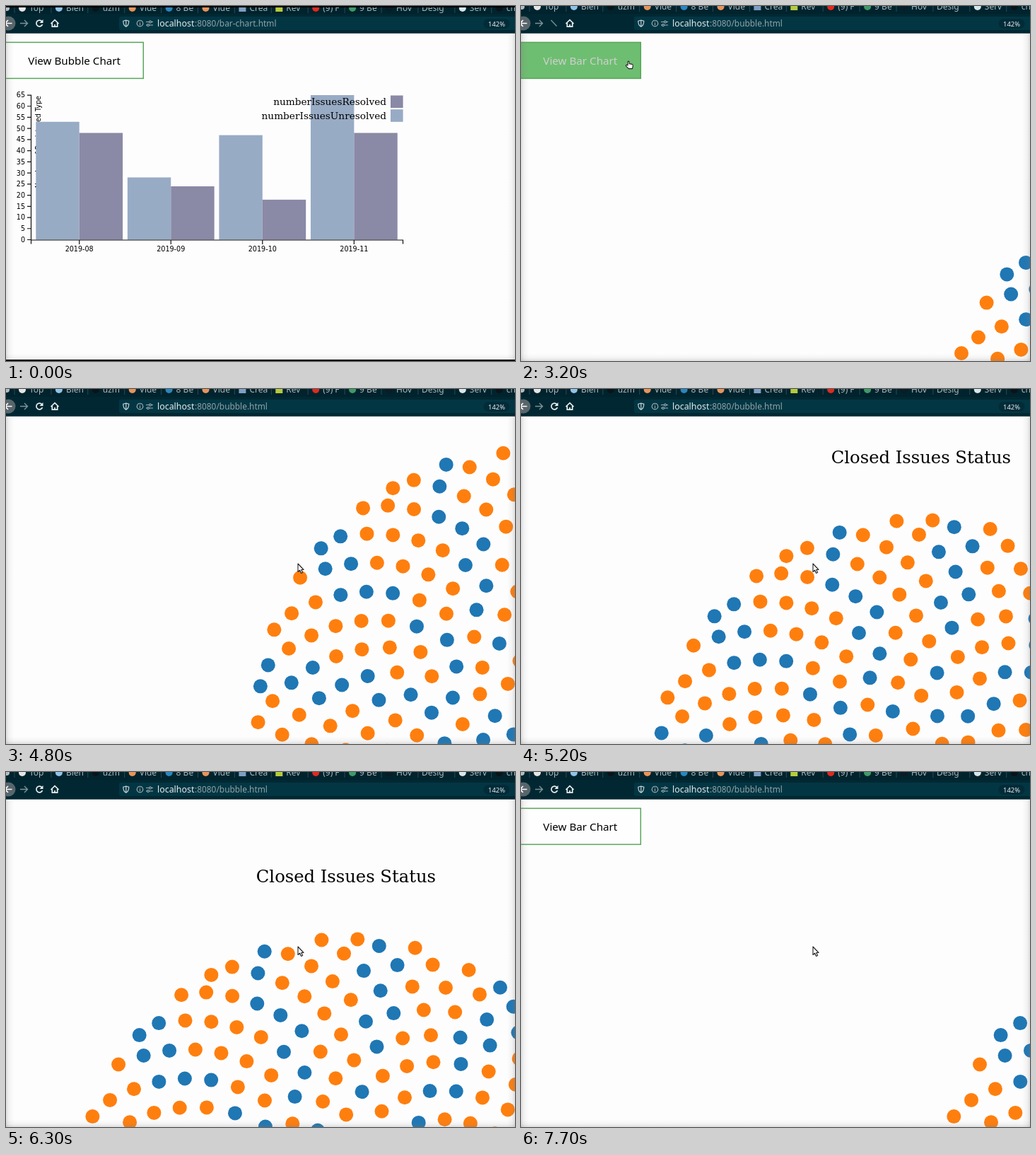
Recreate the animation shown at these times as an HTML page. Size 720 by 502 pixels, loop 8 s.

```html
<!DOCTYPE html>
<html lang="en">
<head>
<meta charset="utf-8">
<title>Issue charts</title>
<style>
html, body { margin: 0; width: 100%; height: 100%; overflow: hidden; background: #fefdfe; }
svg { display: block; width: 720px; height: 502px; }
.ui { font-family: "Noto Sans", "Open Sans", sans-serif; }
.axis { font: 9.6px "DejaVu Sans", sans-serif; }
.serif { font-family: "DejaVu Serif", serif; }
</style>
</head>
<body>
<svg id="stage" viewBox="0 0 720 502" xmlns="http://www.w3.org/2000/svg"></svg>
<script>
const LOOP = 8000, NAV = 2800;
const BLUE = '#1f77b4', ORANGE = '#ff7f0e', STEEL = '#98abc5', PLUM = '#8a89a6';
const GOLDEN = Math.PI * (3 - Math.sqrt(5));

const rect = (x, y, w, h, fill, extra = '') =>
  `<rect x="${x}" y="${y}" width="${w}" height="${h}" fill="${fill}" ${extra}/>`;
const dot = (x, y, r, fill) => `<circle cx="${x}" cy="${y}" r="${r}" fill="${fill}"/>`;
const text = (x, y, str, extra = '') => `<text x="${x}" y="${y}" ${extra}>${str}</text>`;
const line = (d, stroke, width = 1, extra = '') =>
  `<path d="${d}" fill="none" stroke="${stroke}" stroke-width="${width}" ${extra}/>`;

function barChart() {
  const base = 330.5, unit = 204.5 / 65;
  const months = [['2019-08', 53, 48], ['2019-09', 28, 24], ['2019-10', 47, 18], ['2019-11', 65, 48]];
  let out = text(-127, 49, 'Number of Registered Type',
    'class="axis" text-anchor="end" transform="rotate(-90)"');
  let ticks = '', labels = '';
  months.forEach(([name, open, done], i) => {
    const x = 42.3 + i * 129.55, mid = x + 61.4;
    out += rect(x, base - open * unit, 61.4, open * unit, STEEL);
    out += rect(mid, base - done * unit, 61.4, done * unit, PLUM);
    ticks += `M${mid} 331v6`;
    labels += text(mid, 347, name, 'text-anchor="middle"');
  });
  for (let v = 0; v <= 65; v += 5) {
    const y = base - v * unit;
    ticks += `M30 ${y}h5.5`;
    labels += text(27, y + 3.4, v, 'text-anchor="end"');
  }
  out += line('M30 126.2h5.5V336.5M35.5 331H561.5v5.5' + ticks, '#111', 1.2);
  out += `<g class="axis">${labels}</g>`;
  ['numberIssuesResolved', 'numberIssuesUnresolved'].forEach((name, i) => {
    const y = 126.5 + i * 19.7;
    out += rect(544, y, 17.6, 17.6, i ? STEEL : PLUM);
    out += text(538, y + 13.3, name, 'class="serif" font-size="13.68" text-anchor="end"');
  });
  return out;
}

function random(seed) {
  return () => (seed = seed * 16807 % 2147483647) / 2147483647;
}

// Sunflower layout with a flattened rim; blue gathers loosely in angular bands
function bubbles() {
  const rnd = random(2019);
  let out = '';
  for (let i = 0; i < 330; i++) {
    const a = i * GOLDEN, r = Math.min(381, 21.95 * Math.sqrt(i + 0.5));
    const band = Math.cos(12.2 * (a % (2 * Math.PI) - 3.334));
    const fill = band + 0.8 * (rnd() - 0.5) > 0.3 ? BLUE : ORANGE;
    out += dot((r * Math.cos(a)).toFixed(1), (r * Math.sin(a)).toFixed(1), 10, fill);
  }
  return out;
}

function tabs() {
  const list = [
    ['Top', '#e4e6e6'], ['Blen', '#8fc4e8'], ['uzm', '#0a1418'], ['Vide', '#e8945a'],
    ['8 Be', '#2a86c0'], ['Vide', '#e8945a'], ['Crea', '#7f9fc4', 1], ['Rev', '#b5cc3c', 1],
    ['(9) F', '#e02a20'], ['9 Be', '#3f9a68'], ['Hov', '#0a1c26'], ['Desig', ''],
    ['Serv', '#d8e6ea'], ['ch', '#0a1418']
  ];
  let out = dot(1, 1, 4, '#b0bec2');
  list.forEach(([name, fill, square], i) => {
    const x = 12 + i * 51.9;
    out += line(`M${x} -6V8`, '#2b4a54');
    if (fill) out += square ? rect(x + 6, -4, 10, 10, fill) : dot(x + 11, 1, 5, fill);
    out += text(fill ? x + 21 : x + 5, 4.6, name);
  });
  return `<g id="tabs" class="ui" font-size="12" fill="#a9b9be">${out}</g>`;
}

function toolbar() {
  const light = '#e6eef0', grey = '#7d9299', dim = '#9fb0b5';
  return rect(0, 0, 720, 38.5, '#00232d') + tabs() +
    rect(0, 11, 720, 27.5, '#012832') +
    rect(160, 15, 570, 19, '#033643', 'rx="3"') +
    dot(3.5, 24.5, 10, '#58666c') +
    line('M8.5 24.5H-1M3 20l-4.5 4.5L3 29', '#fff', 1.6) +
    line('M20 24.5h10M26 20l4.5 4.5L26 29', grey, 1.4) +
    `<g id="reload">${line('M51 22a4.4 4.4 0 1 0 .5 4', light, 1.7)}<path d="M52.5 19v5h-5z" fill="${light}"/></g>` +
    line('M42.5 20l8 8.5', grey, 1.3, 'id="stop"') +
    line('M63.5 25l5.5-5.3 5.5 5.3M65.3 24v5.2h7.4V24M69 29v-3', light, 1.7) +
    line('M165.8 21.3l4-1.2 4 1.2c0 4-1 6.5-4 8-3-1.5-4-4-4-8zM169.8 20v9', '#c5d2d6', 1.2) +
    line('M189.5 20.3a4.3 4.3 0 1 0 .01 0M189.5 24v3.2M189.5 22v1', dim, 1.1) +
    line('M198 22.5h4.5M205.5 22.5h2.5M198 27h1M202.5 27h5.5', dim, 1.2) +
    line('M204 21a1.5 1.5 0 1 0 .01 0M201 25.5a1.5 1.5 0 1 0 .01 0', dim, 1.1) +
    `<g class="ui">` +
    text(214, 29, 'localhost', `font-size="12.4" fill="${light}"`) +
    text(267, 29, '', 'id="path" font-size="11.9" fill="#91a3a8"') +
    rect(675.5, 18, 37, 14, '#022b38', 'rx="7"') +
    text(694, 28.5, '142%', `font-size="9.4" fill="${light}" text-anchor="middle"`) + '</g>';
}

const shade = (id, dir) =>
  `<linearGradient id="${id}" ${dir}><stop offset="0" stop-color="#777" stop-opacity=".24"/>` +
  `<stop offset=".4" stop-color="#777" stop-opacity=".08"/><stop offset="1" stop-color="#777" stop-opacity="0"/></linearGradient>`;

document.getElementById('stage').innerHTML =
  '<defs>' + shade('left', 'x2="1"') + shade('right', 'x1="1" x2="0"') +
  shade('bottom', 'x2="0" y1="1" y2="0"') + '</defs>' +
  rect(0, 0, 720, 502, '#fefdfe') +
  '<g id="page">' +
  rect(-4, 51.4, 198, 51, '#fff', 'id="button" stroke="#55a658" stroke-width="1.5"') +
  text(31.3, 82.5, '', 'id="label" class="ui" font-size="15.2"') +
  `<g id="bars">${barChart()}</g>` +
  `<g id="bubblePage">${text(970.8, 155.8, 'Closed Issues Status',
    'class="serif" font-size="24.25" text-anchor="middle"')}<g id="cluster">${bubbles()}</g></g>` +
  '</g>' +
  rect(0, 38.5, 11, 464, 'url(#left)') + rect(709, 38.5, 11, 464, 'url(#right)') +
  rect(0, 492, 720, 10, 'url(#bottom)') +
  toolbar() +
  rect(0, 0, 720, 2, '#000', 'id="edgeTop"') + rect(0, 500, 720, 2, '#000', 'id="edgeBottom"') +
  '<g id="cursor" stroke-linejoin="round" fill="#fff" stroke="#222" stroke-width="1.1">' +
  '<path id="arrow" d="M0 0V11.5L2.6 9.2L4.6 13.5L6.6 12.6L4.7 8.5H8z"/>' +
  '<path id="hand" d="M3.6 7V1.8Q4.6 .4 5.6 1.8V4.6L9.8 5.4Q11 5.9 10.8 7.5L10 11.6H4.8L1 7.8Q.6 6.3 2.2 6.3z"/>' +
  '</g>';

const el = {};
document.querySelectorAll('[id]').forEach(node => { el[node.id] = node; });
const show = (node, on) => node.setAttribute('display', on ? 'inline' : 'none');
const place = (node, x, y) => node.setAttribute('transform', `translate(${x} ${y})`);
const clamp = v => Math.min(1, Math.max(0, v));
const ease = u => 1 - (1 - clamp(u)) ** 2.4;

// keys: [time, x, y], linear between neighbours
function track(keys, t) {
  let i = 1;
  while (i < keys.length - 1 && t > keys[i][0]) i++;
  const a = keys[i - 1], b = keys[i], u = clamp((t - a[0]) / (b[0] - a[0]));
  return [a[1] + (b[1] - a[1]) * u, a[2] + (b[2] - a[2]) * u];
}

const pointer = [
  [700, 569, 186], [850, 435, 152], [1000, 470, 147], [1200, 470, 147],
  [1700, 447, 146], [1800, 447, 146], [1900, 172, 82], [2300, 172, 82],
  [2700, 147.5, 77], [3600, 147.5, 77], [4000, 413, 247]
];
const scroll = [
  [3900, 0, 0], [4500, 150, 147], [4800, 232.5, 147], [5400, 490.5, 3],
  [5500, 490.5, 0], [6300, 490.5, 0], [6900, 131.5, 0], [7400, 0, 0]
];

function hover(t) {
  if (t < NAV) return ease((t - 1900) / 400);
  return ease((t - 3000) / 400) - ease((t - 3750) / 400);
}

function render(t) {
  const bar = t < NAV;
  const [sx, sy] = track(scroll, t);
  place(el.page, -sx, -sy);
  show(el.bars, bar);
  show(el.bubblePage, !bar);
  el.path.textContent = bar ? ':8080/bar-chart.html' : ':8080/bubble.html';
  el.label.textContent = bar ? 'View Bubble Chart' : 'View Bar Chart';

  const p = hover(t), mix = (a, b) => Math.round(a + (b - a) * p);
  el.button.setAttribute('width', bar ? 198.3 : 173.3);
  el.button.setAttribute('fill', `rgb(${mix(255, 76)},${mix(254, 175)},${mix(255, 80)})`);
  el.label.setAttribute('fill', `rgb(${mix(0, 255)},${mix(0, 255)},${mix(0, 255)})`);

  // the cluster spreads out while the dots keep their size
  const grow = 1 - 0.6 * Math.exp(-Math.max(0, t - 2850) / 117);
  el.cluster.setAttribute('transform', `translate(970.5 617) scale(${grow})`);
  for (const c of el.cluster.children) c.setAttribute('r', 10 / grow);

  const loading = t >= NAV && t < 3500;
  show(el.reload, !loading);
  show(el.stop, loading);

  const gap = 2 * (1 - clamp(Math.floor(t / 100) / 3));
  place(el.tabs, 0, gap);
  el.edgeTop.setAttribute('height', gap);
  el.edgeBottom.setAttribute('y', 502 - gap);

  const hand = t >= 1860 && t < 3640;
  show(el.cursor, t >= 700);
  show(el.hand, hand);
  show(el.arrow, !hand);
  place(el.cursor, ...track(pointer, t));
}

const start = performance.now();
function tick() {
  render((performance.now() - start) % LOOP);
  requestAnimationFrame(tick);
}
tick();
</script>
</body>
</html>
```
